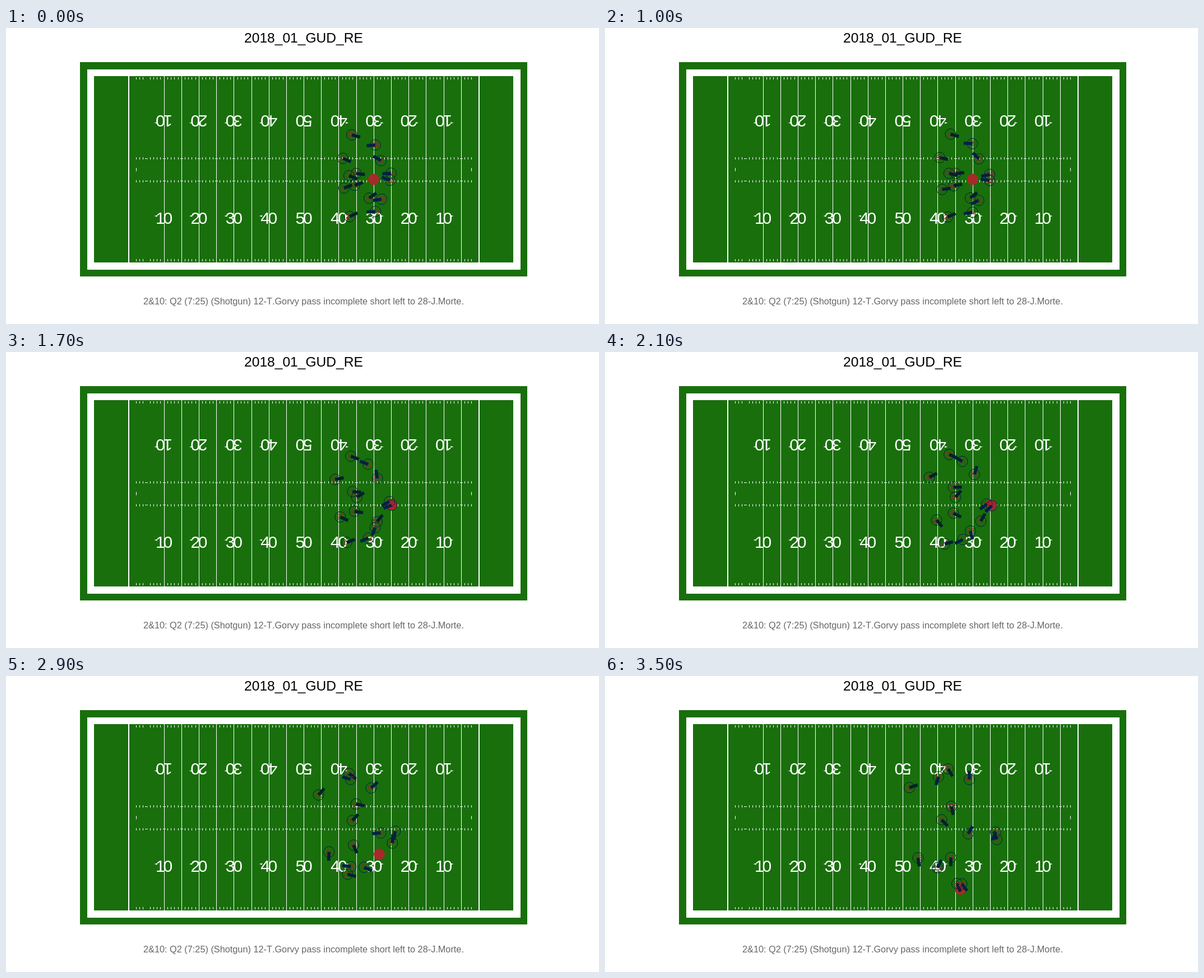
Animation, 1058 px wide and 529 px high, one loop 3600 ms. Source, as an HTML page:

```html
<!DOCTYPE html>
<html lang="en">
<head>
<meta charset="utf-8">
<title>Play animation</title>
<style>
  html, body { margin: 0; width: 100%; height: 100%; overflow: hidden; background: #fff; }
  svg { display: block; width: 100vw; height: 100vh; }
  text { font-family: "Liberation Sans", Arial, sans-serif; text-anchor: middle; font-kerning: none; }
</style>
</head>
<body>
<svg id="stage" viewBox="0 0 1058 529"></svg>
<script>
const LOOP = 3600, STEP = 100, LAST = LOOP - STEP;
const GREEN = '#196f0c', RED = '#a71930', HOME = '#002244', AWAY = '#03202f';
const stage = document.getElementById('stage');

function add(tag, attrs, parent = stage, label) {
  const el = document.createElementNS('http://www.w3.org/2000/svg', tag);
  for (const k in attrs) el.setAttribute(k, attrs[k]);
  if (label !== undefined) el.textContent = label;
  parent.appendChild(el);
  return el;
}
const rect = (x, y, x2, y2, fill) => add('rect', { x, y, width: x2 - x, height: y2 - y, fill });
const yardX = yard => 219.67 + yard * 6.238;
const pixelX = yard => Math.floor(yardX(yard)) + 0.5;

function drawField() {
  rect(132, 61, 930, 444, GREEN);
  rect(145, 74, 918, 432, '#fff');
  rect(157, 86, 905, 419, GREEN);

  let marks = '';
  for (let yard = 2; yard <= 98; yard++) {
    const x = pixelX(yard);
    if (yard % 5) for (const y of [88, 231, 272, 413]) marks += `M${x} ${y}v4`;
    else marks += `M${x - 2.5} 233.5h5M${x - 2.5} 273.5h5` + (yard > 5 ? `M${x} 86V419` : '');
  }
  for (const yard of [2, 98]) marks += `M${pixelX(yard)} 250v6`;
  add('path', { d: marks, stroke: '#fff' });
  add('path', { d: 'M219 86V419M844 86V419', stroke: '#fff', 'stroke-width': 2 });

  for (let yard = 10; yard <= 90; yard += 10) {
    const x = yardX(yard), n = Math.min(yard, 100 - yard);
    for (const turn of [0, 180]) {
      const g = add('g', {
        transform: `translate(${x} ${turn ? 155.5 : 350}) rotate(${turn})`, fill: '#fff', 'font-size': 30
      });
      add('text', { x: -6.7 }, g, n / 10);
      add('text', { x: 6.7 }, g, 0);
    }
    const tip = 17.5 * Math.sign(yard - 50), base = tip * 0.7;
    for (const y of [169.5, 336])
      add('path', { d: `M${x + base} ${y - 1.5}L${x + tip} ${y}L${x + base} ${y + 1.5}Z`, fill: '#fff' });
  }
  add('text', { x: 531, y: 26, 'font-size': 24.6, fill: '#000' }, stage, '2018_01_GUD_RE');
  add('text', { x: 531, y: 494, 'font-size': 16.3, fill: '#666' }, stage,
    '2&10: Q2 (7:25) (Shotgun) 12-T.Gorvy pass incomplete short left to 28-J.Morte.');
}

// Everyone starts slowly and speeds up; each pose value follows a parabola through three poses
const progress = t => (t / LAST) ** 2.5;
const MID = progress(2500);
function through(a, m, b, s) {
  const bend = (m - a - (b - a) * MID) / (MID * (1 - MID));
  return a + (b - a) * s + bend * s * (1 - s);
}

// The ball: snap, catch, drop back, throw, arrival, as [time, x, y]
const FLIGHT = [[1000, 656, 270.5], [1600, 688, 273], [2100, 689, 273], [2600, 682, 287], [LAST, 634, 381]];
function ballAt(t) {
  const i = Math.max(1, FLIGHT.findIndex(p => t <= p[0]));
  const [t0, x0, y0] = FLIGHT[i - 1], [t1, x1, y1] = FLIGHT[i];
  const u = Math.max(0, (t - t0) / (t1 - t0));
  return [x0 + (x1 - x0) * u, y0 + (y1 - y0) * u];
}

drawField();
const ball = add('circle', { r: 10, fill: '#a52a2a' });
const players = [];

// A pose is [x, y, heading in degrees]
function player(number, color, start, mid, end) {
  const g = add('g', {});
  add('circle', { r: 9.5, fill: 'none', stroke: color }, g);
  add('text', { y: 4.2, 'font-size': 12, fill: RED }, g, number);
  const bar = add('path', { d: 'M0 0H15.5', stroke: color, 'stroke-width': 5.6 }, g);
  players.push({ g, bar, pose: s => start.map((a, i) => through(a, mid[i], end[i], s)) });
}

player(22, AWAY, [617, 191, 15], [613, 179, 30], [612, 166, 58]);
player(32, AWAY, [601, 233, 22], [568.5, 219, -43], [543, 199.5, -18]);
player(55, AWAY, [625, 260, 7], [623, 259, -58], [600.5, 257, 45]);
player(23, AWAY, [612, 264, 20], [624, 234, 0], [618, 233, 78]);
player(41, AWAY, [622, 281, -18], [621, 293.5, 47], [617, 324.5, 90]);
player(25, AWAY, [603, 286, -20], [585, 307, 75], [558.5, 325, 82]);
player(59, AWAY, [648, 304, -35], [680, 301, -73], [699, 292, -110]);
player(24, AWAY, [613, 337, -25], [606, 347.5, -4], [628, 371, 67]);

player(15, HOME, [659, 209, 175], [627, 190, 212], [595, 180, 107]);
player(87, HOME, [669, 237, 210], [655, 210, 309], [650, 185, 270]);
player(34, HOME, [687, 259.5, 176], [676.5, 276.5, 148], [648, 282, 300]);
player(12, HOME, [685, 272, 200], [692, 276, 113], [697, 279, 110]);
player(28, HOME, [670, 306, 172], [645, 329, 45], [636.5, 371.5, 53]);
player(13, HOME, [659, 328, 176], [628, 338, 160], [593, 342.5, 298]);

function draw(time) {
  const t = Math.floor((time % LOOP) / STEP) * STEP;
  const [bx, by] = ballAt(t);
  ball.setAttribute('transform', `translate(${bx} ${by})`);
  for (const p of players) {
    const [x, y, heading] = p.pose(progress(t));
    p.g.setAttribute('transform', `translate(${x} ${y})`);
    p.bar.setAttribute('transform', `rotate(${heading})`);
  }
}

let start;
function tick(now) {
  start ??= now;
  draw(now - start);
  requestAnimationFrame(tick);
}
draw(0);
requestAnimationFrame(tick);
</script>
</body>
</html>
```
